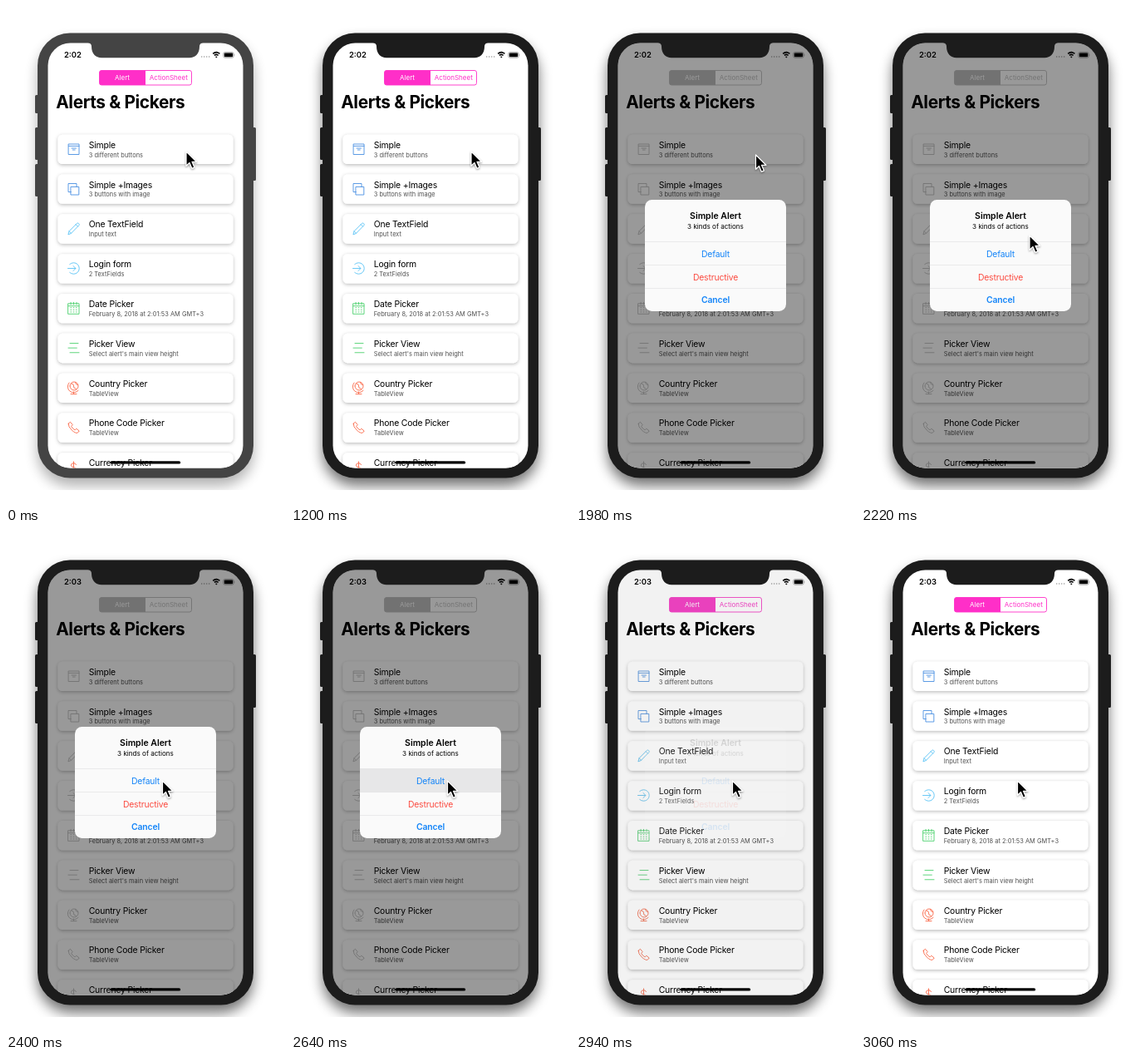
Write an HTML page that moves like this. It is 336 by 600 pixels and loops after 3720 ms.

```html
<!DOCTYPE html>
<html lang="en">
<head>
<meta charset="utf-8">
<title>Alerts &amp; Pickers</title>
<style>
  html, body { margin: 0; width: 100%; height: 100%; overflow: hidden; background: #fff; }
  svg { display: block; width: 336px; height: 600px; font-family: Inter, Roboto, sans-serif; }
  .head { font-size: 20.8px; font-weight: 700; letter-spacing: -.35px; }
  .clock { font-size: 9.4px; font-weight: 600; }
  .seg { font-size: 8px; text-anchor: middle; }
  .name { font-size: 10.4px; letter-spacing: -.165px; }
  .note { font-size: 7.4px; letter-spacing: .05px; fill: #505050; }
  .icon { fill: none; stroke: currentColor; stroke-width: .9; stroke-linecap: round; stroke-linejoin: round; }
  #alert { text-anchor: middle; }
  .bold { font-weight: 600; }
  .rule { stroke: #dfdfe1; stroke-width: .6; }
</style>
</head>
<body>
<svg viewBox="0 0 336 600">
  <defs>
    <clipPath id="screen"><rect x="50.5" y="44.5" width="235" height="511" rx="27"/></clipPath>
    <clipPath id="photo"><rect width="336" height="582"/></clipPath>
    <clipPath id="box"><rect x="83" y="233" width="170" height="134" rx="8.5"/></clipPath>
    <filter id="soft" x="-30%" y="-30%" width="160%" height="160%"><feGaussianBlur stdDeviation="8"/></filter>
    <filter id="lift" x="-10%" y="-40%" width="120%" height="200%">
      <feDropShadow dx="0" dy="1.3" stdDeviation="2.3" flood-opacity=".28"/>
    </filter>
    <filter id="drop" x="-50%" y="-50%" width="200%" height="200%">
      <feDropShadow dx="0" dy="1.2" stdDeviation="1" flood-opacity=".4"/>
    </filter>
  </defs>

  <g clip-path="url(#photo)">
    <rect id="shade" x="38" y="42" width="260" height="535" rx="40" filter="url(#soft)"/>
  </g>
  <g id="body">
    <path d="M35 108.5q0-1.5 1.5-1.5H40v22h-3.500q-1.500 0-1.500-1.500zM35 147.500q0-1.500 1.500-1.500H40v39h-3.500q-1.500 0-1.500-1.500zM35 191.500q0-1.500 1.500-1.500H40v39h-3.500q-1.500 0-1.500-1.500zM296 146h3.500q1.500 0 1.500 1.500v61q0 1.500-1.500 1.500H296z"/>
    <rect x="38" y="32.500" width="260" height="535" rx="39"/>
  </g>

  <g clip-path="url(#screen)">
    <rect x="50" y="44" width="236" height="512" fill="#fff"/>
    <text id="clock" class="clock" x="70" y="62.200"></text>
    <g fill="#999"><circle cx="235.700" cy="61" r=".8"/><circle cx="238.700" cy="61" r=".8"/><circle cx="241.700" cy="61" r=".8"/><circle cx="244.700" cy="61" r=".8"/></g>
    <g fill="none" stroke="#000" stroke-width="1.500">
      <path d="M249.200 57.400q4.100-3.500 8.200 0M250.900 59.400q2.400-2 4.800 0"/>
      <path d="M253.300 62.500l-1.300-1.600q1.300-1 2.600 0z" fill="#000" stroke="none"/>
    </g>
    <rect x="261.800" y="55.600" width="12.400" height="6.600" rx="1.900" fill="none" stroke="#777" stroke-width=".6"/>
    <rect x="262.800" y="56.600" width="10.400" height="4.600" rx="1"/>
    <path d="M274.900 57.700q1 1.200 0 2.400z" fill="#777"/>

    <g class="tint" data-color="255,47,200">
      <rect x="112.500" y="77.500" width="111" height="17.500" rx="2.500" fill="#fff" stroke="currentColor" stroke-width=".9"/>
      <path d="M168 77.500h-53q-2.500 0-2.500 2.500v12.500q0 2.500 2.500 2.500h53z" fill="currentColor"/>
      <text class="seg" x="140" y="89.200" fill="#fff">Alert</text>
      <text class="seg" x="195.800" y="89.200" fill="currentColor">ActionSheet</text>
    </g>
    <text class="head" x="60.200" y="122.700">Alerts &amp; Pickers</text>
    <g id="list"></g>
    <rect x="125.500" y="547.200" width="84.700" height="3.400" rx="1.700"/>
    <rect id="dim" x="50" y="44" width="236" height="512"/>
  </g>
  <path id="notch" d="M97 44c4 0 6 1.500 6 5c0 8 5 13.300 12 13.300H221c7 0 12-5.300 12-13.300c0-3.500 2-5 6-5z"/>

  <g id="alert">
    <g clip-path="url(#box)">
      <rect x="83" y="233" width="170" height="134" fill="#fafafa"/>
      <rect id="press" x="83" y="283.500" width="170" height="28" fill="#e7e7e8"/>
      <path class="rule" d="M83 283.500h170M83 311.500h170M83 339.500h170"/>
    </g>
    <text class="bold" font-size="10.500" x="168" y="255.800">Simple Alert</text>
    <text font-size="8.100" x="168" y="268.300">3 kinds of actions</text>
    <text class="name" x="168" y="301.600" fill="#1384f8">Default</text>
    <text class="name" x="168" y="329.600" fill="#fb4b40">Destructive</text>
    <text class="name bold" x="168" y="357.300" fill="#1384f8">Cancel</text>
  </g>

  <path id="cursor" d="M0 0V17.200L4 13.400L6.900 20.200L9.900 18.900L7 12.300H12.400Z" stroke="#fff" stroke-width="1.200" stroke-linejoin="round" filter="url(#drop)"/>
</svg>

<script>
const LOOP = 3720;
const $ = id => document.getElementById(id);

const blue = '74,144,226', sky = '90,195,245', green = '76,209,110', red = '250,104,72';

// Icons are drawn around their own centre.
const dots = [-3.2, 0, 3.2].flatMap(x => [-.6, 2, 4.6].map(y => `M${x - .4} ${y}h.8`)).join('');
const rows = [
  ['Simple', '3 different buttons', blue,
    'M-6-6H6.500V6.500H-6zM-6-3.600H6.500M-2.500-1H3M-1.200 1H1.700'],
  ['Simple +Images', '3 buttons with image', blue,
    'M-3.200-2.400H6.300V7.200H-3.200zM-3.200 3.800H-6.500V-6.300H3.500V-2.400'],
  ['One TextField', 'Input text', sky,
    'M-6.500 6.800L-5.400 3L4-6.400Q5-7.200 6.200-6Q7.200-4.900 6.400-4L-3 5.600zM-5.400 3L-3 5.600M2.600-5L5-2.600'],
  ['Login form', '2 TextFields', sky,
    'M-4.800-4.900A6.800 6.800 0 1 1-4.800 4.900M-7 0H2.500M-.6-3L2.500 0L-.6 3'],
  ['Date Picker', 'February 8, 2018 at 2:01:53 AM GMT+3', green,
    'M-6.500-5.500H6.500V7H-6.500zM-6.500-2.600H6.500M-3.500-7V-4.500M0-7V-4.500M3.500-7V-4.500' + dots],
  ['Picker View', "Select alert's main view height", green,
    'M-4.500-5.600H5.500M-6.500 0H3.800M-4.500 5.600H6.500'],
  ['Country Picker', 'TableView', red,
    'M-4.500-2A5 5 0 1 1 5.500-2A5 5 0 1 1-4.500-2M-5.500-6A7 7 0 0 0 5.500 3.300M0 5V7.500M-3.500 7.600H3.500M-3-5.200Q1-4 0-2T3 1.500M2-6.500Q2-3.500 5-3.300'],
  ['Phone Code Picker', 'TableView', red,
    'M-6.300-4.600L-4.100-6.600L-1.300-3.200L-2.900-1.500Q-1.500 1.500 1.600 3L3.300 1.400L6.700 4.200L4.700 6.400Q2.600 7.300-2 3.500Q-7-1.300-6.300-4.600z'],
  ['Currency Picker', 'TableView', red,
    'M3-3Q2.300-5 0-5Q-3.200-4.800-3.200-2.400Q-3-.4 0 0Q3.300.6 3.300 2.800Q3 5 0 5.200Q-3 5-3.400 2.800M0-6.800V7'],
];

$('list').innerHTML = rows.map(([name, note, color, d], i) => `
  <g transform="translate(0 ${47.83 * i})">
    <rect x="62.5" y="154.700" width="211" height="35.300" rx="5.500" fill="#fff" filter="url(#lift)"/>
    <path class="icon tint" data-color="${color}" transform="translate(81.500 172)" d="${d}"/>
    <text class="name" x="99.700" y="170.700">${name}</text>
    <text class="note" x="99.700" y="181.600">${note}</text>
  </g>`).join('');

const tints = [...document.querySelectorAll('.tint')].map(el =>
  ({ el, rgb: el.dataset.color.split(',').map(Number) }));

// time, dim, grey tint, alert opacity, alert scale, pressed
const poses = [
  [0, 0, 0, 0, 1, 0],
  [1560, .385, 1, 1, 1.006, 0],
  [1680, .395, 1, 1, 1.002, 0],
  [1800, .4, 1, 1, 1, 0],
  [2640, .4, 1, 1, 1, 1],
  [2760, .34, .76, .94, 1, 0],
  [2940, .05, .15, .12, 1, 0],
  [3060, 0, 0, 0, 1, 0],
];

// time, x, y of the pointer tip
const path = [
  [0, 217, 175], [1980, 216.500, 179], [2040, 214.500, 194], [2100, 211, 222],
  [2160, 207, 254], [2220, 203, 276], [2280, 196.500, 288], [2340, 191, 296], [2400, 188.500, 298],
];

const at = (table, t) => table.findLast(step => step[0] <= t);
const GREY = 190;

function draw(t) {
  const [, dim, grey, alpha, scale, pressed] = at(poses, t);
  const [, x, y] = at(path, t);
  const faded = t < 1200;

  const shell = faded ? '#444' : '#1c1c1c';
  $('body').style.fill = $('notch').style.fill = shell;
  $('shade').style.opacity = faded ? .3 : .55;
  $('clock').textContent = t < 2400 ? '2:02' : '2:03';
  $('dim').style.opacity = dim;
  for (const { el, rgb } of tints)
    el.style.color = `rgb(${rgb.map(c => Math.round(c + (GREY - c) * grey))})`;

  $('alert').style.opacity = alpha;
  $('alert').setAttribute('transform', `translate(168 300) scale(${scale}) translate(-168 -300)`);
  $('press').style.opacity = pressed;
  $('cursor').setAttribute('transform', `translate(${x} ${y})`);
}

const start = performance.now();
function tick(now) {
  draw(Math.max(0, now - start) % LOOP);
  requestAnimationFrame(tick);
}
draw(0);
requestAnimationFrame(tick);
</script>
</body>
</html>
```
